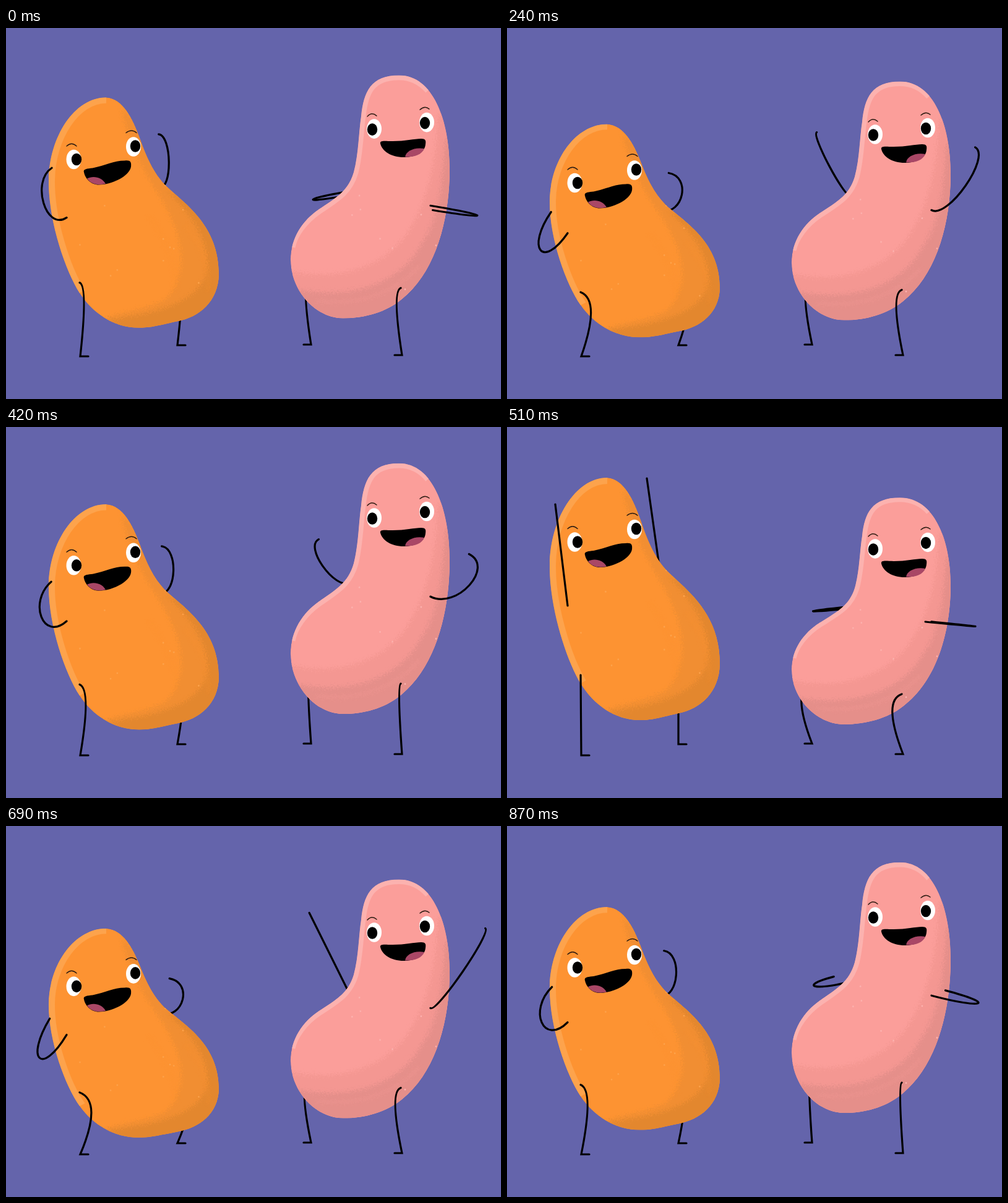
These frames come from a looping animation (800x600 px, 0.9 s). An HTML page:

```html
<!DOCTYPE html>
<html lang="en">
<head>
<meta charset="utf-8">
<title>Dancing beans</title>
<style>
  html, body { margin: 0; width: 100%; height: 100%; overflow: hidden; background: #6464ab; }
  svg { display: block; width: 100%; height: 100%; }
  .limb { fill: none; stroke: #000; stroke-width: 3.2; stroke-linecap: round; }
  .brow { fill: none; stroke: #2a1a10; stroke-width: 1.4; stroke-linecap: round; }
</style>
</head>
<body>
<svg id="stage" viewBox="0 0 800 600">
  <filter id="grain" x="-10%" y="-10%" width="120%" height="120%">
    <feGaussianBlur stdDeviation="2.5" result="soft"/>
    <feTurbulence type="fractalNoise" baseFrequency=".45" numOctaves="2" seed="4"/>
    <feDisplacementMap in="soft" scale="20" xChannelSelector="R" yChannelSelector="G"/>
  </filter>
</svg>
<script>
const FRAMES = 30, FRAME_MS = 30;

// Beats are the frames of the up and down poses in turn.
// Pairs hold a value in the up pose and in the down pose.
const beans = [
  {
    id: 'orange', fill: '#fd9332', rim: '#fda34c', rimWidth: 20, shades: ['#f18e31', '#e3872f'],
    refTop: 82, refBottom: 474,
    beats: [3, 10.5, 17, 25], top: [82, 180], drop: [0, 35], lift: [0, 86],
    armBeats: [3, 10.5, 17, 25], armPower: .6,
    outline: 'M162 82C190 84 205 120 215 148C224 174 235 207 258 232C290 264 344 300 344 383C343 430 312 456 277 463C250 469 235 474 215 474C175 474 140 450 119 415C95 375 68 290 69 222C70 150 110 82 162 82Z',
    rimPath: 'M119 415C95 375 68 290 69 222C70 150 110 82 162 82',
    shadePaths: [
      'M186 100C206 190 236 226 258 268C290 330 292 390 258 425C225 446 185 444 155 462L215 490L360 460V280L230 140Z',
      'M258 240C312 290 334 345 322 385C310 425 250 452 160 460L215 490L360 460V280Z'
    ],
    grooves: 'M232 285C262 330 276 370 274 410M290 300C322 340 330 375 326 410',
    eyes: [[109.5, 186, 114, 186], [206, 165.5, 209, 164.5]],
    brows: 'M98 164.5Q106 157 114 164.5M194 143Q203 136 211 143',
    mouth: 'M126 207C124 201 132 201 140 200C160 196 174 188 192 188C201 187 203 190 202 198C199 214 170 227 150 227C137 227 128 217 126 207Z',
    tongue: 'M131 217C140 212 155 214 161 225.5C150 228 138 227 131 217Z',
    legs: { bend: 1.25, toe: 13, front: [119, 401, 120, 531], back: [277, 383, 277, 513] },
    frontArm: { hand: [[78, 125], [70, 330]], shoulder: [[98, 289], [98, 346]], elbow: [[-1, 0], [-.5, 1]], reach: 155 },
    backArm: { hand: [[226, 83], [268, 263]], shoulder: [[247, 232], [250, 317]], elbow: [[1, 0], [1, .2]], reach: 120 }
  },
  {
    id: 'pink', fill: '#fb9e9a', rim: '#fcb2af', rimWidth: 15, shades: ['#f49792', '#e58f8a'],
    refTop: 69, refBottom: 460,
    beats: [12, 19, 27, 34], top: [42, 131], drop: [-1, 26], lift: [-24, 56],
    armBeats: [10.5, 19, 22, 33.5], armPower: 1.5,
    outline: 'M635 69C690 69 717 140 717 220C717 300 695 385 640 429C615 450 580 460 545 460C500 460 460 415 460 366C460 330 480 302 505 285C535 265 553 255 562 225C570 195 570 160 574 135C578 95 590 69 635 69Z',
    rimPath: 'M460 345C464 325 480 302 505 285C535 265 553 255 562 225C570 195 570 160 574 135C578 95 590 69 635 69C655 69 672 78 684 92',
    shadePaths: [
      'M450 382C530 402 600 382 642 332C680 280 694 220 698 130L730 130V470H450Z',
      'M462 412C540 428 610 415 655 365C690 320 704 270 710 170L730 170V470H470Z'
    ],
    grooves: 'M500 432C570 440 630 420 668 375M680 330C694 300 702 270 704 240',
    eyes: [[595, 156, 592, 157], [680, 145.5, 677, 146.5]],
    brows: 'M584 136Q591 128 599 135M669 125Q677 118 684 124',
    mouth: 'M605 180C604 174 612 176 625 176C645 176 660 172 671 172C678 172 679 175 678 181C677 195 660 202 643 202C622 202 608 192 605 180Z',
    tongue: 'M645 201.5C646 192 660 185 676 188C672 198 660 202 645 201.5Z',
    legs: { bend: -1.5, toe: -12, front: [638, 411, 640, 529], back: [491, 394, 493, 512] },
    frontArm: { hand: [[775, 165], [653, 350]], shoulder: [[686, 262], [686, 327]], elbow: [[.7, .5], [1, 0]], reach: 180 },
    backArm: { hand: [[490, 140], [560, 330]], shoulder: [[555, 240], [555, 302]], elbow: [[-.7, .5], [-1, 0]], reach: 135 }
  }
];

const mix = ([a, b], k) => a + (b - a) * k;
const mixPoint = ([a, b], k) => [mix([a[0], b[0]], k), mix([a[1], b[1]], k)];

// 0 in the up poses, 1 in the down poses, eased like a cosine between them
function bounce(beats, frame) {
  const f = frame < beats[0] ? frame + FRAMES : frame;
  const ends = [...beats, beats[0] + FRAMES];
  const i = ends.findLastIndex(beat => beat <= f);
  const wave = Math.cos(Math.PI * (i + (f - ends[i]) / (ends[i + 1] - ends[i])));
  return (1 - wave) / 2;
}

// A rubber hose: the nearer the hand is to the shoulder, the further the elbow bulges
function arm({ hand, shoulder, elbow, reach }, armDown, bodyDown) {
  const [hx, hy] = mixPoint(hand, armDown), [sx, sy] = mixPoint(shoulder, bodyDown);
  const [ex, ey] = mixPoint(elbow, armDown);
  const bulge = .63 * Math.max(0, reach - Math.hypot(sx - hx, sy - hy));
  const dx = ex * bulge, dy = ey * bulge;
  return `M${hx} ${hy}C${hx + dx} ${hy + dy} ${sx + dx} ${sy + dy} ${sx} ${sy}`;
}

function leg({ bend, toe }, [x, y, footX, footY], drop) {
  const hip = y + drop;
  return `M${x} ${hip}Q${x + bend * drop} ${hip + drop / 2} ${footX} ${footY}h${toe}`;
}

function pose(b, frame) {
  const down = bounce(b.beats, frame);
  const armDown = bounce(b.armBeats, frame) ** b.armPower;
  const top = mix(b.top, down), drop = mix(b.drop, down);
  const baseline = b.refBottom + drop;
  const scale = (baseline - top) / (b.refBottom - b.refTop);
  b.parts.body.setAttribute('transform', `matrix(1 0 0 ${scale} 0 ${top - b.refTop * scale})`);
  b.parts.face.setAttribute('transform', `translate(0 ${mix(b.lift, down)})`);
  for (const side of ['front', 'back']) {
    b.parts[side + 'Arm'].setAttribute('d', arm(b[side + 'Arm'], armDown, down));
    b.parts[side + 'Leg'].setAttribute('d', leg(b.legs, b.legs[side], drop));
  }
}

let seed = 7;
const random = () => (seed = seed * 16807 % 2147483647) / 2147483647;

const ellipse = (x, y, rx, ry, fill) =>
  `<ellipse cx="${x}" cy="${y}" rx="${rx}" ry="${ry}" fill="${fill}"/>`;

function markup(b) {
  const shade = b.shadePaths.map((d, i) => `<path d="${d}" fill="${b.shades[i]}" filter="url(#grain)"/>`).join('');
  const eyes = b.eyes.map(([x, y, px, py]) =>
    ellipse(x, y, 12, 15.8, '#fff') + ellipse(px, py, 8.2, 9.8, '#000')).join('');
  const left = b.legs.back[0] < b.legs.front[0] ? 470 : 90;
  let specks = '';
  for (let i = 0; i < 12; i++) specks += ellipse(left + random() * 240, 220 + random() * 220, 1.3, 1.5, b.rim);
  return `<clipPath id="${b.id}-clip"><path d="${b.outline}"/></clipPath>
    <path class="limb" data-part="backArm"/><path class="limb" data-part="backLeg"/>
    <g data-part="body"><g clip-path="url(#${b.id}-clip)">
      <path d="${b.outline}" fill="${b.fill}"/>${shade}
      <path d="${b.grooves}" fill="none" stroke="${b.fill}" stroke-width="3" opacity=".45" filter="url(#grain)"/>
      <path d="${b.rimPath}" fill="none" stroke="${b.rim}" stroke-width="${b.rimWidth}"/>${specks}
    </g></g>
    <g data-part="face">${eyes}<path class="brow" d="${b.brows}"/>
      <path d="${b.mouth}"/><path d="${b.tongue}" fill="#a94766"/></g>
    <path class="limb" data-part="frontArm"/><path class="limb" data-part="frontLeg"/>`;
}

const stage = document.getElementById('stage');
for (const b of beans) {
  const group = document.createElementNS('http://www.w3.org/2000/svg', 'g');
  group.innerHTML = markup(b);
  stage.append(group);
  b.parts = {};
  group.querySelectorAll('[data-part]').forEach(el => b.parts[el.dataset.part] = el);
}

let shown = -1;
const start = performance.now();
function tick() {
  const frame = Math.floor((performance.now() - start) / FRAME_MS) % FRAMES;
  if (frame !== shown) beans.forEach(b => pose(b, frame));
  shown = frame;
  requestAnimationFrame(tick);
}
tick();
</script>
</body>
</html>
```
